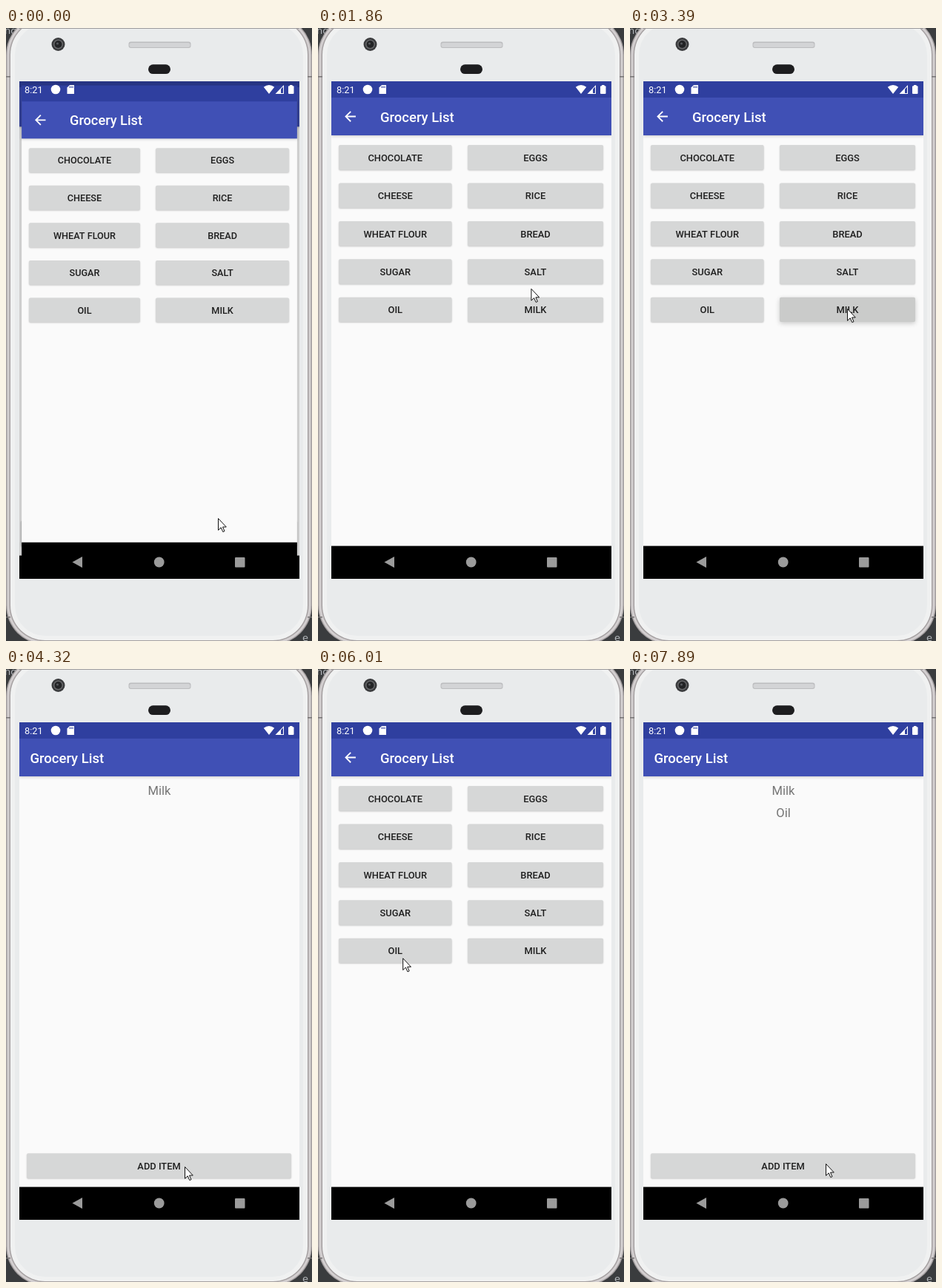
Animation, 413 px wide and 828 px high, one loop 8000 ms. Source, as an HTML page with a canvas:

```html
<!DOCTYPE html>
<html lang="en">
<head>
<meta charset="utf-8">
<title>Grocery list</title>
<style>
  html, body { margin: 0; width: 100%; height: 100%; overflow: hidden; background: #3a3c3e; }
  canvas { display: block; }
</style>
</head>
<body>
<canvas id="stage" width="413" height="828"></canvas>
<script>
const c = document.getElementById('stage').getContext('2d');
const LOOP = 8000, STEP = 135, CX = 207, CY = 408;
const SETTLE = .48; // share of a page transition left after each step

// Pointer gestures: a curve to `to`, bent towards `via`
const home = [286, 662];
const gestures = [
  { start: 540, end: 1560, to: [153, 193], via: [86, -71] },
  { start: 1710, end: 2380, to: [293, 379], via: [309, 353] },
  { start: 3394, end: 3810, to: [238, 625] },
  { start: 3930, end: 4320, to: [241, 672] },
  { start: 5440, end: 5860, to: [141, 300] },
  { start: 6010, end: 6550, to: [106, 375], via: [104, 445] },
  { start: 7354, end: 7890, to: [264, 668] }
];

// The item picker opens and closes over the list
const transitions = [
  { start: -405, end: 270, opens: true },
  { start: 3256, end: 3671, adds: 'Milk' },
  { start: 4880, end: 5580, opens: true },
  { start: 7220, end: 7622, adds: 'Oil' }
];

const products = [['CHOCOLATE', 'EGGS'], ['CHEESE', 'RICE'], ['WHEAT FLOUR', 'BREAD'],
  ['SUGAR', 'SALT'], ['OIL', 'MILK']];

const arrow = new Path2D('M20 11H7.83l5.59-5.59L12 4l-8 8 8 8 1.41-1.41L7.83 13H20z');
const pointer = new Path2D('M.5 .5V16.3L4.2 12.8 6.8 18.6 9 17.6 6.5 12H11.3Z');

// The picture advances in steps: index of the current one and of the last
function stepOf(t, { start, end }) {
  const last = Math.round((end - start) / STEP);
  const i = Math.floor((t - start) / (end - start) * last + 1e-6);
  return [Math.min(i, last), last];
}

function pointerAt(t) {
  let from = home;
  for (const g of gestures) {
    if (t < g.start) break;
    const [i, last] = stepOf(t, g), rest = (1 - (i + 1) / (last + 1)) ** 3, u = 1 - rest;
    const via = g.via || g.to;
    from = from.map((v, k) => rest * rest * v + 2 * u * rest * via[k] + u * u * g.to[k]);
  }
  return from;
}

function rect(x, y, w, h, fill) {
  c.fillStyle = fill;
  c.fillRect(x, y, w, h);
}

function round(x, y, w, h, r, fill) {
  c.beginPath();
  c.roundRect(x, y, w, h, r);
  c.fillStyle = fill;
  c.fill();
}

function disc(x, y, r, fill) {
  c.beginPath();
  c.arc(x, y, r, 0, 7);
  c.fillStyle = fill;
  c.fill();
}

function poly(points, fill) {
  c.beginPath();
  points.forEach(p => c.lineTo(...p));
  c.closePath();
  c.fillStyle = fill;
  c.fill();
}

function text(s, x, y, size, weight, fill, align = 'left') {
  c.font = `${weight} ${size}px Roboto, sans-serif`;
  c.textAlign = align;
  c.fillStyle = fill;
  c.fillText(s, x, y);
}

function shadow(alpha, blur, dy) {
  c.shadowColor = `rgba(0,0,0,${alpha})`;
  c.shadowBlur = blur;
  c.shadowOffsetY = dy;
}

function button(x, mid, w, label, pressed) {
  c.save();
  shadow(.2, pressed ? 6 : 2, pressed ? 2 : 1);
  round(x, mid - 16.7, w, 33.4, 2, pressed ? '#cacbca' : '#d6d7d7');
  c.restore();
  text(label, x + w / 2, mid + 4.9, 12.87, 500, '#1f1f1f', 'center');
}

function page(titleX) {
  rect(18, 140, 378, 562, '#fafafa');
  c.save();
  shadow(.2, 4, 1);
  rect(18, 93, 378, 52, '#4050b5');
  c.restore();
  rect(18, 72, 378, 22, '#2f3f9f');
  rect(18, 699.6, 378, 44.4, '#000');
  text('Grocery List', titleX, 126.6, 18.5, 500, '#fff');
}

function listPage(items, pressed) {
  page(32.5);
  items.forEach((s, i) => text(s, CX, 170 + 30 * i, 16.55, 400, '#757575', 'center'));
  button(28, 671, 357, 'ADD ITEM', pressed);
}

function pickerPage(pressed) {
  page(84);
  c.save();
  c.translate(32.5, 108.5);
  c.scale(.92, .92);
  c.fillStyle = '#fff';
  c.fill(arrow);
  c.restore();
  products.forEach(([left, right], i) => {
    const mid = 174.8 + 51.4 * i;
    button(28, mid, 152.5, left, left === pressed);
    button(202, mid, 183, right, right === pressed);
  });
}

function zoomed(s, alpha, draw) {
  c.save();
  c.globalAlpha = alpha;
  c.translate(CX, CY);
  c.scale(s, s);
  c.translate(-CX, -CY);
  draw();
  c.restore();
}

function screen(t) {
  const begun = transitions.filter(tr => t >= tr.start), now = begun[begun.length - 1];
  const items = begun.filter(tr => tr.adds).map(tr => tr.adds);
  const [i, last] = stepOf(t, now), rest = i < last ? SETTLE ** i : 0;
  const p = now.opens ? 1 - rest : rest;
  const alpha = now.opens ? Math.min(1, 1.29 * p) : Math.max(0, 2 * p - .8);
  const pressed = t >= 2840 && t < 3394 ? 'MILK' : t >= 6950 && t < 7220 ? 'OIL' : '';
  c.save();
  c.beginPath();
  c.rect(18, 72, 378, 672);
  c.clip();
  if (p < 1) {
    // the list stays behind, slightly enlarged and dimmed
    zoomed(1 + .05 * p, 1, () => listPage(items, now.opens && i < 2));
    rect(18, 72, 378, 672, `rgba(0,0,0,${.25 * p ** 3})`);
  }
  if (p > 0) zoomed(.85 + .15 * p, Math.min(1, alpha), () => pickerPage(pressed));
  c.restore();
}

function systemBars() {
  text('8:21', 25, 88, 12.8, 400, '#fff');
  disc(67, 83, 6.3, '#fff');
  poly([[86, 77], [92, 77], [92, 89], [82.5, 89], [82.5, 80.5]], '#fff');
  for (let x = 85.6; x < 91; x += 2) rect(x, 78.5, 1, 2.5, '#2f3f9f');
  // wifi, signal, battery
  c.beginPath();
  c.moveTo(355, 89);
  c.lineTo(347.8, 79.8);
  c.quadraticCurveTo(355, 74.4, 362.2, 79.8);
  c.fillStyle = '#fff';
  c.fill();
  poly([[375, 77], [375, 89], [363.5, 89]], '#fff');
  poly([[374, 79.4], [374, 88], [371, 88], [371, 82.4]], '#2f3f9f');
  round(381, 78.3, 7.5, 10.7, 1, '#fff');
  rect(383, 77, 3.5, 2, '#fff');
  poly([[89.5, 721.5], [103, 714], [103, 729]], '#9b9b9b');
  disc(206.7, 721.5, 6.9, '#9b9b9b');
  round(309, 715, 13.5, 13.5, 1, '#9b9b9b');
}

function phone() {
  rect(0, 0, 413, 828, '#3a3c3e');
  c.font = '13px "DejaVu Sans", sans-serif';
  c.textAlign = 'left';
  c.fillStyle = '#b4b8bc';
  c.fillText('ng', -2, 8);
  c.fillText('e', 400, 828);
  // nested shells, from the outer rim to the face
  const shell = (inset, fill) =>
    round(inset, inset - 17, 413 - 2 * inset, 850 - 2 * inset, 53 - inset, fill);
  shell(0, '#a39e9f');
  shell(1.5, '#d3cfd0');
  shell(4.5, '#a5a0a1');
  shell(6, '#f0f1f1');
  shell(12, '#e9ebec');
  rect(17, 0, 379, 1, '#9c9a9b');
  for (const x of [0, 407]) {
    rect(x, 65, 6, 1.5, '#777475');
    rect(x, 795, 6, 1.5, '#777475');
  }
  disc(70.5, 22, 9, '#3a3b3d');
  disc(70.5, 22, 6.5, '#68696b');
  disc(70.5, 22, 5, '#232426');
  disc(69.5, 21, 1.6, '#55585c');
  round(165.5, 18.5, 84, 8.5, 3, '#bcbdbf');
  round(166.5, 20, 82, 6, 2.5, '#d3d4d6');
  round(192, 49.3, 30, 12.8, 6.4, '#1d1d1f');
}

function drawPointer(t) {
  c.save();
  c.translate(...pointerAt(t));
  c.fillStyle = '#fff';
  c.fill(pointer);
  c.strokeStyle = '#111';
  c.lineWidth = 1;
  c.stroke(pointer);
  c.restore();
}

const start = performance.now();

function frame() {
  const t = (performance.now() - start) % LOOP;
  phone();
  screen(t);
  systemBars();
  drawPointer(t);
  requestAnimationFrame(frame);
}
frame();
</script>
</body>
</html>
```
